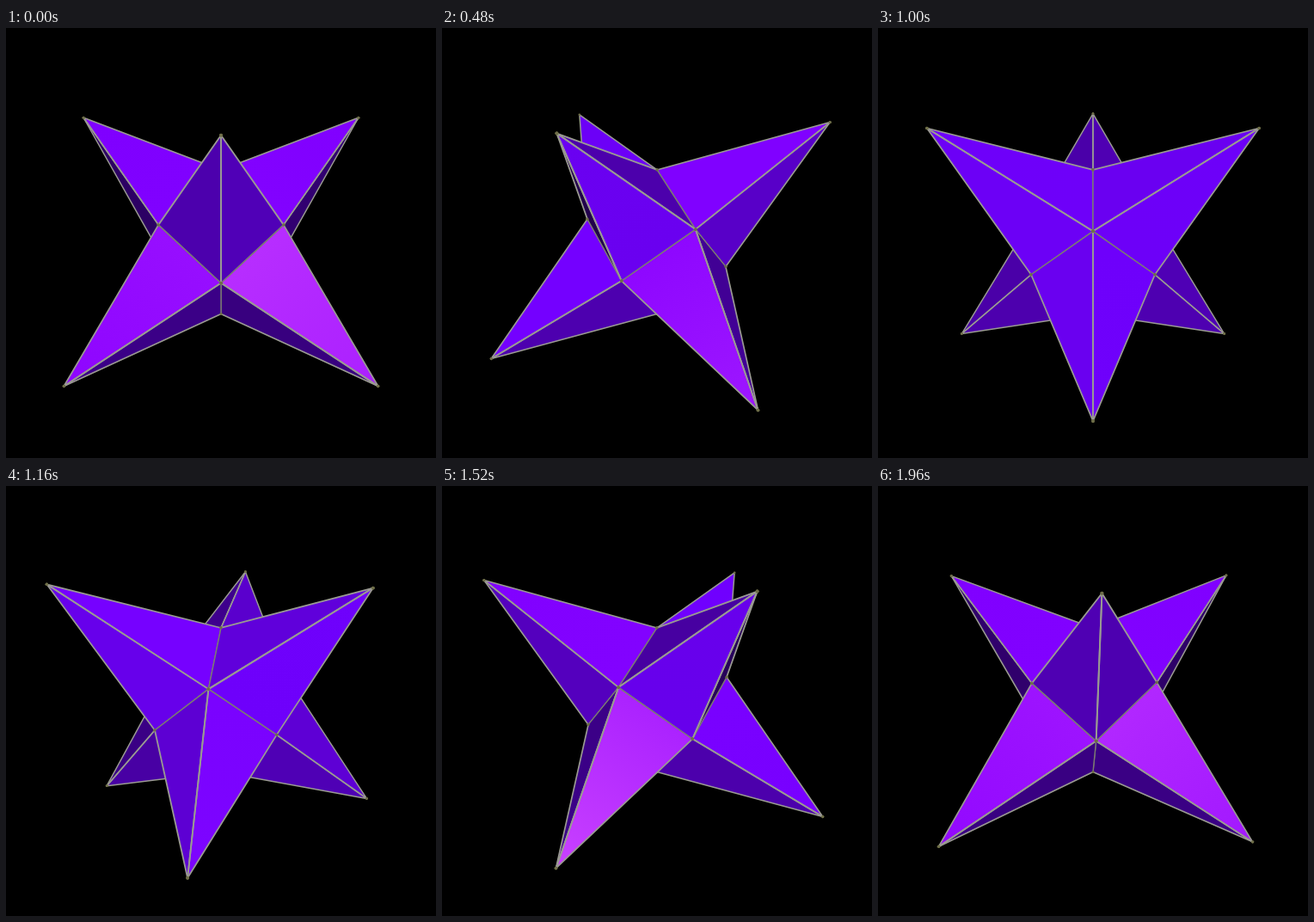
These frames come from a looping animation (500x500 px, 2 s). An HTML page with a canvas:

```html
<!DOCTYPE html>
<html>
<head>
<meta charset="utf-8">
<style>
html, body { margin: 0; width: 100%; height: 100%; overflow: hidden; background: #000; }
canvas { display: block; width: 500px; height: 500px; }
</style>
</head>
<body>
<canvas id="stage"></canvas>
<script>
const SIZE = 500, LOOP = 2000, STEP = 40;
const SCALE = 85.3, PERSPECTIVE = 0.081;
const TILT = 11 * Math.PI / 180, SIN = Math.sin(TILT), COS = Math.cos(TILT);
const HALF = 1 / Math.sqrt(3), TIP = 2.827;
const RIDGE = { color: '#9a9a92', width: 1.6 };
const VALLEY = { color: '#7c7c72', width: 1.35 };

const canvas = document.getElementById('stage');
const ratio = window.devicePixelRatio || 1;
canvas.width = canvas.height = SIZE * ratio;
const ctx = canvas.getContext('2d');
ctx.scale(ratio, ratio);
ctx.lineCap = ctx.lineJoin = 'round';

const add = (a, b) => a.map((v, i) => v + b[i]);
const mul = (a, s) => a.map(v => v * s);
const dot = (a, b) => a[0] * b[0] + a[1] * b[1] + a[2] * b[2];
const unit = a => mul(a, 1 / Math.hypot(...a));
const camera = [0, SIN / PERSPECTIVE, COS / PERSPECTIVE];

// Cube face directions, with the cube standing on a corner
function cubeAxes(turn) {
  return [0, 1, 2, 3, 4, 5].map(i => {
    const a = i * Math.PI / 3 - turn, r = Math.sqrt(2 / 3);
    return [r * Math.sin(a), i % 2 ? -HALF : HALF, r * Math.cos(a)];
  });
}

function project([x, y, z]) {
  const zoom = 1 / (1 - PERSPECTIVE * (z * COS + y * SIN));
  return {
    x: SIZE / 2 + SCALE * x * zoom,
    y: SIZE / 2 - SCALE * (y * COS - z * SIN) * zoom,
    zoom
  };
}

function shade(n, p) {
  const light = 0.28 + 0.03 * n[0] + 0.32 * n[1] + 0.92 * n[2];
  const dx = n[0] - 0.1 + 0.08 * p[0];
  const dy = n[1] - 0.27 + 0.08 * p[1];
  const gloss = n[2] > 0 ? 0.28 * 255 * Math.exp(-(dx * dx + dy * dy) / 0.07) : 0;
  const rgb = [112 * light + gloss, gloss, 255 * light + gloss];
  return `rgb(${rgb.map(v => Math.round(Math.max(0, Math.min(255, v)))).join()})`;
}

function drawEdge(a, b, style) {
  ctx.strokeStyle = style.color;
  ctx.lineWidth = style.width * (a.zoom + b.zoom) / 2;
  ctx.beginPath();
  ctx.moveTo(a.x, a.y);
  ctx.lineTo(b.x, b.y);
  ctx.stroke();
}

function drawFace(axes, i, j) {
  const k = [0, 1, 2].find(m => m !== i % 3 && m !== j % 3);
  const tip = mul(axes[i], TIP);
  const normal = unit(add(mul(axes[i], HALF), mul(axes[j], TIP - HALF)));
  if (dot(normal, add(camera, mul(tip, -1))) <= 0) return null;

  const middle = mul(add(axes[i], axes[j]), HALF);
  const side = mul(axes[k], HALF);
  const [t, m, a, b] = [tip, middle, add(middle, side), add(middle, mul(side, -1))].map(project);
  const fill = ctx.createLinearGradient(m.x, m.y, t.x, t.y);
  fill.addColorStop(0, shade(normal, middle));
  fill.addColorStop(1, shade(normal, tip));
  ctx.fillStyle = fill;
  ctx.beginPath();
  ctx.moveTo(t.x, t.y);
  ctx.lineTo(a.x, a.y);
  ctx.lineTo(b.x, b.y);
  ctx.closePath();
  ctx.fill();
  return [t, a, b];
}

function drawSpike(axes, i) {
  const faces = [0, 1, 2, 3, 4, 5]
    .filter(j => j % 3 !== i % 3)
    .map(j => drawFace(axes, i, j))
    .filter(Boolean);
  for (const [t, a, b] of faces) {
    drawEdge(a, b, VALLEY);
    drawEdge(t, a, RIDGE);
    drawEdge(t, b, RIDGE);
  }
  ctx.fillStyle = '#6e6e48';
  for (const p of faces.flat()) {
    ctx.beginPath();
    ctx.arc(p.x, p.y, 1.6 * p.zoom, 0, 2 * Math.PI);
    ctx.fill();
  }
}

function draw(time) {
  const step = Math.floor((time % LOOP) / STEP);
  const axes = cubeAxes(step * STEP / LOOP * 2 * Math.PI / 3);
  ctx.fillStyle = '#000';
  ctx.fillRect(0, 0, SIZE, SIZE);
  // Spikes never cross, so their direction alone gives the depth order
  axes.map((axis, i) => ({ i, depth: dot(axis, camera) }))
    .sort((a, b) => a.depth - b.depth)
    .forEach(({ i }) => drawSpike(axes, i));
}

const start = performance.now();
function tick() {
  draw(performance.now() - start);
  requestAnimationFrame(tick);
}
tick();
</script>
</body>
</html>
```
